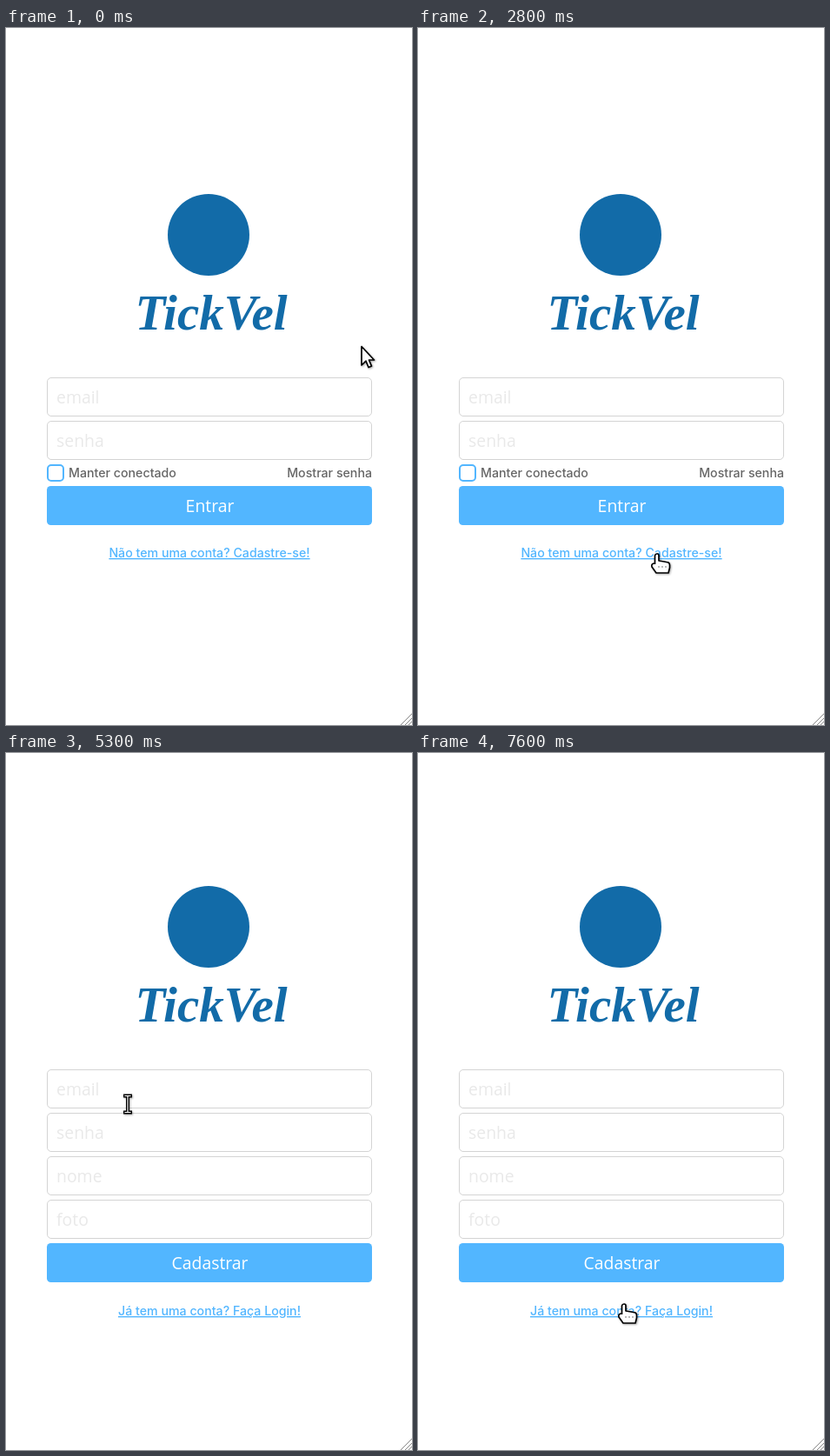
Write an HTML page that moves like this. It is 467 px wide and 802 px high and loops after 8000 ms.

```html
<!DOCTYPE html>
<html lang="pt-BR">
<head>
<meta charset="utf-8">
<title>Login</title>
<style>
  html, body { margin: 0; width: 100%; height: 100%; overflow: hidden; background: #fff; }
  svg { display: block; }
  .field { fill: #fff; stroke: #d4d4d4; }
  .hint, .action { font: 19.4px "Open Sans", "Noto Sans", sans-serif; }
  .hint { fill: #e9e9e9; }
  .button { fill: #52b6ff; }
  .check { fill: #fff; stroke: #52b6ff; stroke-width: 2; }
  .action, .link, .brand { text-anchor: middle; }
  .action { fill: #fff; }
  .small, .link { font: 500 14.2px Inter, sans-serif; }
  .small { fill: #666; }
  .right { text-anchor: end; }
  .link { fill: #52b6ff; text-decoration: underline; }
  .brand { font: italic bold 57px "Liberation Serif", serif; fill: #126ba8; }
  .shape { fill: #fff; stroke: #000; stroke-width: 1.7; stroke-linejoin: round; }
  .grip { fill: none; stroke: #888; }
  #beam { fill: none; stroke: #000; stroke-width: 4; stroke-linecap: square; }
  #beam .core { stroke: #fff; stroke-width: 1.2; }
  #cursor { filter: drop-shadow(1px 1px 1px rgba(0, 0, 0, .35)); }
</style>
</head>
<body>
<svg width="467" height="802" viewBox="0 0 467 802">
  <g id="login"></g>
  <g id="signup"></g>
  <path class="grip" d="M454 802l13-13m-8 13l8-8m-4 8l4-4"/>
  <g id="cursor">
    <path id="arrow" class="shape" d="M1 1.5V23l5-4.800L9 25.500l3.500-1.500L9.500 17h6z"/>
    <g id="hand">
      <path class="shape" d="M-2.500 10V0Q-2-2 0-2T2 0V6L8 7L13 8Q14.500 9 14.500 11V14L13 20H-1L-6 13Q-7 9-2.500 9"/>
      <path d="M1 13h2m2 0h2m2 0h2" stroke="#777"/>
    </g>
    <g id="beam">
      <path d="M-3-9.500h6m-3 0v19m-3 0h6"/>
      <path class="core" d="M-3-9.500h6m-3 0v19m-3 0h6"/>
    </g>
  </g>
</svg>
<script>
const LOOP = 8000, STEP = 100, SWITCH = 3400, PITCH = 50, HEIGHT = 45;
const $ = id => document.getElementById(id);
const text = (kind, x, y, s) => `<text class="${kind}" x="${x}" y="${y}">${s}</text>`;

const logo = y => `<circle cx="233" cy="${y + 46}" r="47" fill="#126ba8"/>` +
  text('brand', 236, y + 155, 'TickVel');
const field = (y, hint) =>
  `<rect class="field" x="47.5" y="${y + .5}" width="373" height="${HEIGHT - 1}" rx="4.5"/>` +
  text('hint', 58, y + 30, hint);
const button = (y, label) =>
  `<rect class="button" x="47" y="${y}" width="374" height="${HEIGHT}" rx="4.6"/>` +
  text('action', 234.5, y + 30, label);

const pages = {
  login: {
    top: 402, hints: ['email', 'senha'], button: 527, action: 'Entrar',
    link: 'Não tem uma conta? Cadastre-se!',
    extra: '<rect class="check" x="48" y="503" width="18" height="18" rx="4"/>' +
      text('small', 72, 517, 'Manter conectado') +
      text('small right', 421, 517, 'Mostrar senha')
  },
  signup: {
    top: 364, hints: ['email', 'senha', 'nome', 'foto'], button: 564, action: 'Cadastrar',
    link: 'Já tem uma conta? Faça Login!', extra: ''
  }
};

for (const [id, p] of Object.entries(pages)) {
  p.linkTop = p.top + p.hints.length * PITCH + (id === 'login' ? 93 : 69);
  $(id).innerHTML = logo(p.top - 210) +
    p.hints.map((hint, i) => field(p.top + PITCH * i, hint)).join('') +
    p.extra + button(p.button, p.action) + text('link', 234, p.linkTop + 14, p.link);
}

// Key points of the pointer: time, x, y
const path = [
  [400, 408, 365], [1300, 252, 464], [1700, 130, 579], [2200, 237, 610],
  [2450, 257, 613], [2800, 275, 607], [4500, 275, 607], [4900, 313, 525],
  [5200, 168, 398], [5300, 140, 404], [5700, 122, 462], [6300, 138, 552],
  [6750, 157, 602], [7300, 256, 634], [7600, 237, 636]
];

const slope = (i, axis) => {
  const a = path[i], b = path[i + 1];
  return a && b ? (b[axis] - a[axis]) / (b[0] - a[0]) : 0;
};

// Harmonic mean of neighbouring slopes: smooth, with no overshoot at turns and rests
function tangent(i, axis) {
  const a = slope(i - 1, axis), b = slope(i, axis);
  return a * b > 0 ? 2 * a * b / (a + b) : 0;
}

function along(t, axis) {
  const next = path.findIndex(p => p[0] > t);
  if (next < 1) return path.at(next)[axis];
  const i = next - 1, span = path[next][0] - path[i][0];
  const u = (t - path[i][0]) / span, v = 1 - u;
  return Math.round(
    path[i][axis] * v * v * (1 + 2 * u) + path[next][axis] * u * u * (3 - 2 * u) +
    span * u * v * (tangent(i, axis) * v - tangent(next, axis) * u));
}

function cursorOver(p, x, y) {
  const row = y - p.top;
  const within = (top, height) => y >= top && y < top + height;
  if (row >= 0 && row < p.hints.length * PITCH && row % PITCH < HEIGHT) return x < 421 ? 'beam' : 'arrow';
  return within(p.button, HEIGHT) || within(p.linkTop, 18) && x > 118 && x < 350 ? 'hand' : 'arrow';
}

const show = (id, on) => $(id).style.display = on ? '' : 'none';

function draw(now) {
  const t = Math.floor(now % LOOP / STEP) * STEP;
  const page = t < SWITCH ? 'login' : 'signup';
  const x = along(t, 1), y = along(t, 2);
  // A new page keeps the plain arrow until the pointer moves
  const resting = t >= SWITCH && t <= 4500;
  const kind = resting ? 'arrow' : cursorOver(pages[page], x, y);
  for (const id in pages) show(id, id === page);
  for (const id of ['arrow', 'hand', 'beam']) show(id, id === kind);
  $('cursor').setAttribute('transform', `translate(${x} ${y})`);
  requestAnimationFrame(draw);
}
draw(0);
</script>
</body>
</html>
```
